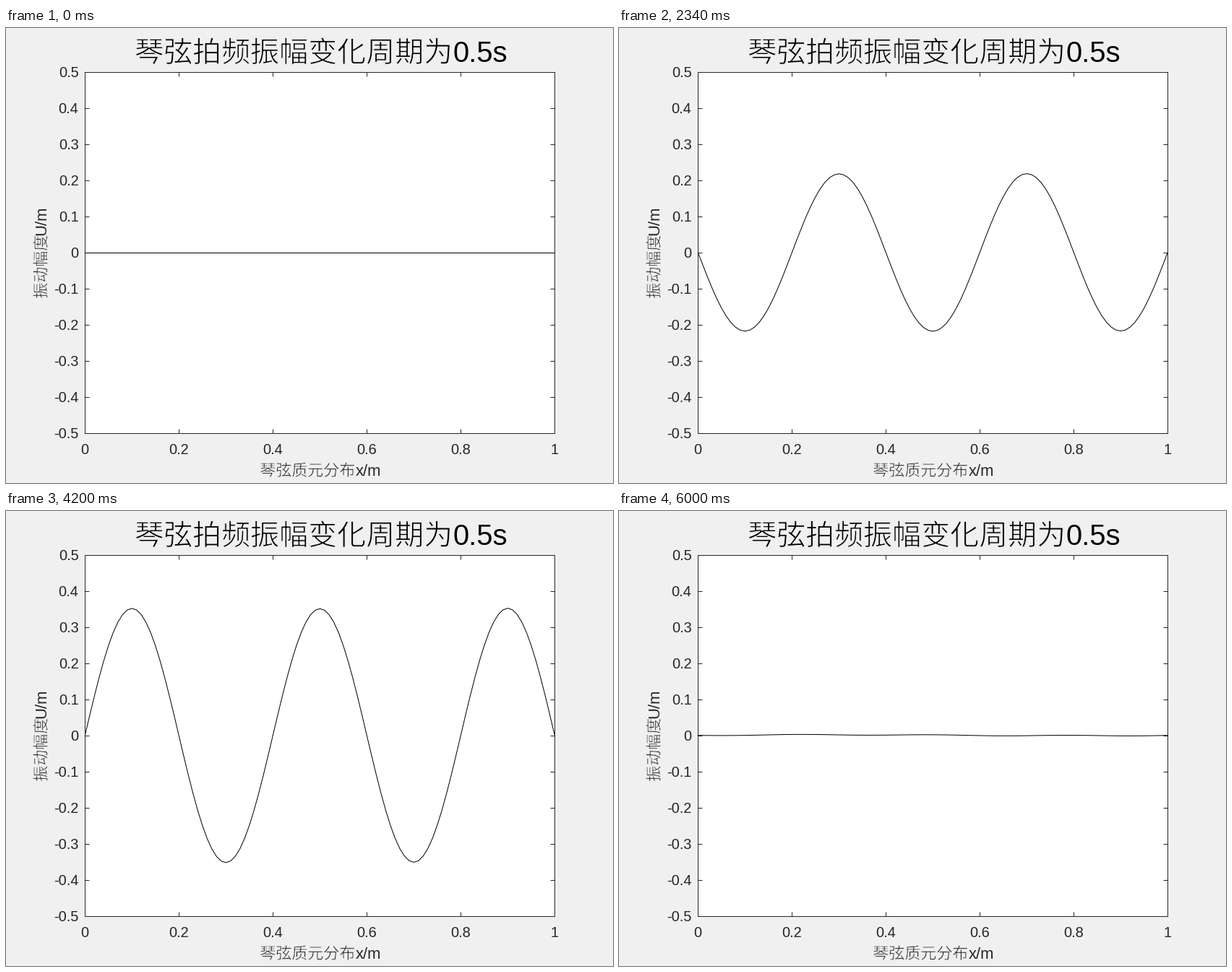
These frames come from a looping animation (840 px wide and 630 px high, 6.06 s). A matplotlib script:

```python
import numpy as np
import matplotlib.pyplot as plt
from matplotlib.animation import FuncAnimation
from matplotlib.patheffects import Stroke

W, H, DPI = 840, 630, 100
PX = 72 / DPI                      # points per pixel
LEFT, RIGHT, TOP, BOTTOM = 109.3, 759.3, 60.7, 560.7
FRAMES, STEP_MS = 101, 60
INK, PAPER = "#262626", "#f0f0f0"
LATIN, HAN = "Liberation Sans", "Noto Sans CJK JP"

PEAK = 0.435                       # largest swing of the beat
CARRIER = 0.17125 * np.pi          # fast phase advance per frame
BEAT = np.pi / 100                 # envelope phase advance per frame
RIPPLE = 0.0455 * np.pi            # phase advance of the faint side modes

fig = plt.figure(figsize=(W / DPI, H / DPI), dpi=DPI, facecolor=PAPER)
ax = fig.add_axes([LEFT / W, 1 - BOTTOM / H,
                   (RIGHT - LEFT) / W, (BOTTOM - TOP) / H])
ax.set(xlim=(0, 1), ylim=(-0.5, 0.5), facecolor="white")


def label(x, y, text, size, color=INK, ha="left", rotation=0, font=LATIN):
    """Text with its baseline at a pixel position measured from the top left."""
    return fig.text(x / W, 1 - y / H, text, fontsize=size * PX, color=color,
                    family=font, ha=ha, va="baseline",
                    rotation=rotation, rotation_mode="anchor")


def caption(x, y, han, latin, size, thin, color=INK, rotation=0):
    """Han characters, slimmed by a paper-coloured outline, then Latin text."""
    t = label(x, y, han, size, color, rotation=rotation, font=HAN)
    t.set_path_effects([Stroke(linewidth=thin * PX, foreground=PAPER)])
    run = len(han) * size
    if rotation:
        y -= run
    else:
        x += run
    label(x, y, latin, size, color, rotation=rotation)


xticks = np.arange(6) / 5
yticks = np.arange(-5, 6) / 10
ax.set_xticks(xticks)
ax.set_yticks(yticks)
ax.tick_params(direction="in", length=6 * PX, width=PX, color=INK,
               top=True, right=True, labelbottom=False, labelleft=False)
for spine in ax.spines.values():
    spine.set(linewidth=PX, edgecolor=INK)

for v in xticks:
    label(LEFT + v * (RIGHT - LEFT) - 0.3, 590, f"{v:g}", 20, ha="center")
for v in yticks:
    label(100.6, TOP + (0.5 - v) * (BOTTOM - TOP) + 7.3, f"{v:g}", 20, ha="right")

caption(178.2, 47, "琴弦拍频振幅变化周期为", "0.5s", 40, 1.0, color="black")
caption(351.3, 620, "琴弦质元分布", "x/m", 22, 0.6)
caption(55.7, 374.7, "振动幅度", "U/m", 22, 0.6, rotation=90)

x = np.linspace(0, 1, 101)
string, = ax.plot(x, 0 * x, color="black", linewidth=PX, clip_on=False)


def mode(k):
    return np.sin(k * np.pi * x)


side_modes = 0.0008 * mode(1) + 0.0012 * mode(2) - 0.001 * mode(7)


def update(n):
    swing = PEAK * np.sin(BEAT * n) * np.cos(CARRIER * n)
    ripple = n / 100 * np.sin(RIPPLE * n)
    string.set_ydata(swing * mode(5) + ripple * side_modes)
    return string,


anim = FuncAnimation(fig, update, frames=FRAMES, interval=STEP_MS,
                     repeat=True, repeat_delay=0, blit=False)
plt.show()
```
